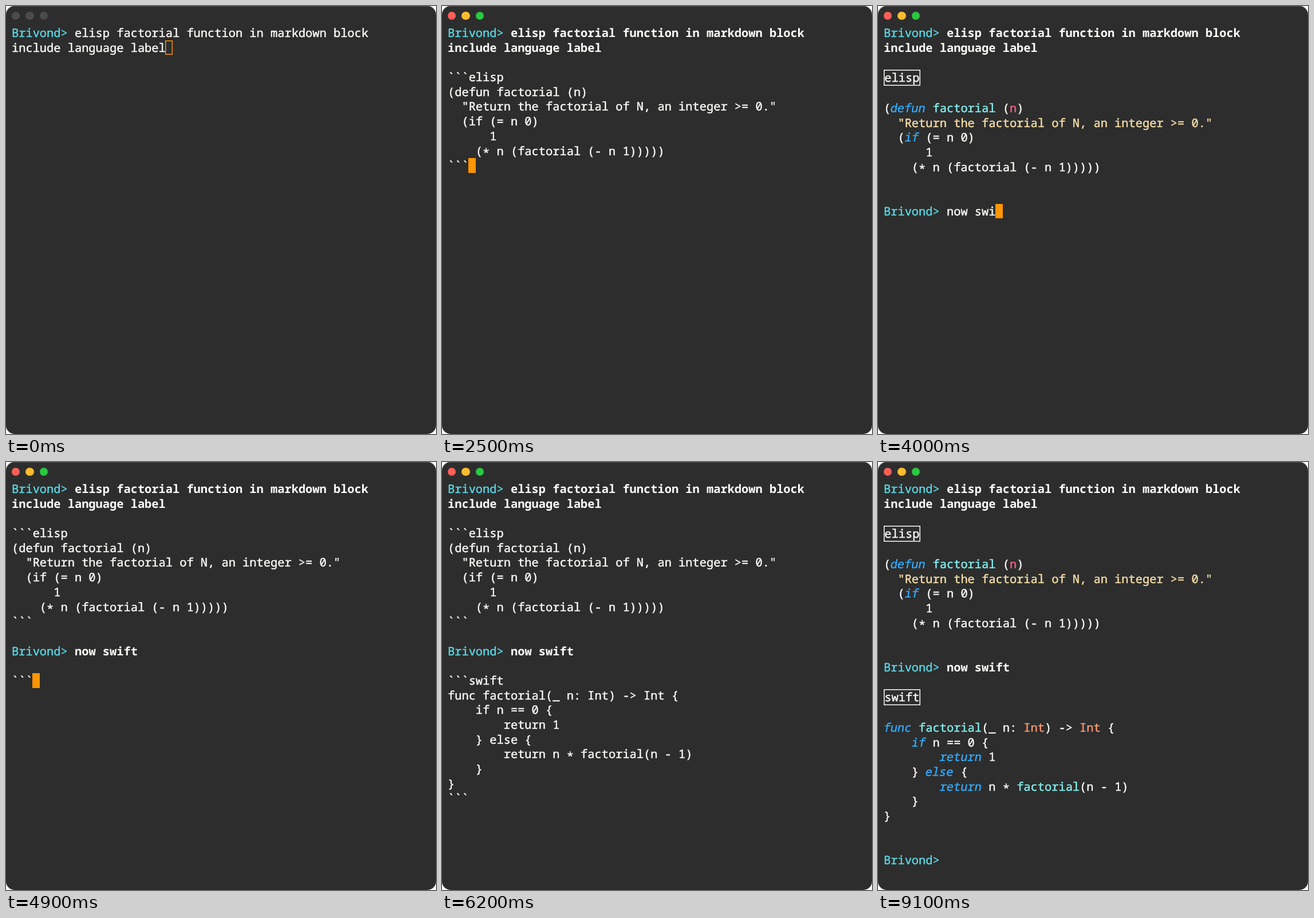
Animation, 751 px wide and 746 px high, one loop 9200 ms. Source, as an HTML page:

```html
<!DOCTYPE html>
<html lang="en">
<head>
<meta charset="utf-8">
<title>Shell chat</title>
<style>
  html, body { margin: 0; width: 100%; height: 100%; overflow: hidden; background: #fff; }
  #win {
    position: relative; width: 751px; height: 746px; overflow: hidden;
    border-radius: 15px; background: #2d2d2d; box-shadow: inset 0 1px 0 #505050;
  }
  .dot { position: absolute; top: 10px; width: 14.4px; height: 14.4px; border-radius: 50%; }
  .dot:nth-child(1) { left: 10px; background: #ff5f57; }
  .dot:nth-child(2) { left: 34.4px; background: #febc2e; }
  .dot:nth-child(3) { left: 58.8px; background: #28c840; }
  .blur .dot { background: #4b4b4b; }
  #screen {
    position: absolute; left: 10px; top: 34px; color: #fcfcfa; white-space: pre;
    font: 500 20.367px/24.6px "Noto Sans Mono", "DejaVu Sans Mono", monospace;
    font-variant-ligatures: none; text-rendering: geometricPrecision;
    -webkit-text-stroke: 0.45px currentColor;
  }
  .row { position: relative; height: 25.7px; }
  .row:has(.label) { height: 28.2px; }
  .label {
    display: inline-block; height: 28.2px; line-height: 26.4px; padding: 0 1.3px;
    box-shadow: inset 0 0 0 1.5px #fcfcfa;
  }
  .cursor {
    position: absolute; top: 0; width: 12.7px; height: 25.7px;
    margin-left: -0.4px; background: #ff9500;
  }
  .blur .cursor { background: none; box-shadow: inset 0 0 0 1.4px #ff9500; }
  .off .cursor { visibility: hidden; }
  b { font-weight: 700; -webkit-text-stroke: 0; }
  .prompt { color: #5ad9e6; }
  .key { color: #32acfa; display: inline-block; transform: skewX(-10deg); }
  .fn { color: #85f1f0; }
  .arg { color: #f7607f; }
  .str { color: #f8e0a8; }
  .type { color: #fc9a75; }
  .star { position: relative; top: 3.5px; }
</style>
</head>
<body>
<div id="win">
  <div class="dot"></div><div class="dot"></div><div class="dot"></div>
  <div id="screen"></div>
</div>
<script>
const LOOP = 9200, BLINK = 500;
const win = document.getElementById('win');
const screen = document.getElementById('screen');

const tag = (cls, text) => `<span class="${cls}">${text}</span>`;
const bold = text => text.split('\n').map(line => `<b>${line}</b>`).join('\n');
const paint = (text, rules) =>
  rules.reduce((out, [cls, re]) => out.replace(re, m => tag(cls, m)), text);

const prompt = tag('prompt', 'Brivond&gt;') + ' ';
const ask = 'elisp factorial function in markdown block\ninclude language label';
const next = 'now swift';

// Bars mark the chunks in which each answer arrives.
const elispParts = `\`\`\`|elisp
|(defun factorial| (n)
  "Return| the factorial of| N,| an integer| >= 0|."
  (if| (= n 0|)
      1||
    (* n| (factorial| (- n 1|)))))
\`\`\``.split('|');

const swiftParts = `\`\`\`|swift
func| factorial(_| n: Int|) -> Int| {
    if| n == 0| {
        return| 1
    }| else {
        return| n * factorial|(n -| 1)
    }|
}
\`\`\``.split('|');

const elispRaw = elispParts.join('');
const swiftRaw = swiftParts.join('');

// Turns a fenced answer into a boxed label and coloured code.
function pretty(raw, rules) {
  const [fence, ...code] = raw.split('\n');
  return tag('label', fence.slice(3)) + '\n\n' + paint(code.slice(0, -1).join('\n'), rules) + '\n\n\n';
}

const elispPretty = pretty(elispRaw, [
  ['str', /"Return.*"/],
  ['arg', /(?<=\()n(?=\))/],
  ['fn', /(?<=defun )factorial/],
  ['key', /defun|\bif\b/g]
]);
const swiftPretty = pretty(swiftRaw, [
  ['type', /\bInt\b/g],
  ['fn', /factorial/g],
  ['key', /\b(func|if|else|return)\b/g]
]);

const events = [];
const add = (time, text, key) => events.push({ time, text, key });

function stream(start, head, parts) {
  let text = head;
  parts.forEach((part, i) => add(start + i * 100, text += part));
}

const asked = prompt + bold(ask) + '\n';
const first = asked + '\n' + elispPretty + prompt;
const second = prompt + bold(next) + '\n';

add(0, prompt + ask, true);
add(100, prompt + ask, true);
add(500, asked, true);
stream(1000, asked + '\n', elispParts);
add(2600, first);
[...next].forEach((ch, i) => {
  add(3000 + i * 100 + Math.max(0, i - 2) * 100, first + next.slice(0, i + 1), true);
});
add(4600, asked + '\n' + elispPretty + second, true);
stream(4900, asked + '\n' + elispRaw + '\n\n' + second + '\n', swiftParts);
add(6400, asked + '\n' + elispPretty + second + '\n' + swiftPretty + prompt);

function render(text) {
  const html = text.replace(/\*/g, tag('star', '*')) + tag('cursor', '');
  screen.innerHTML = html.split('\n').map(line => `<div class="row">${line}</div>`).join('');
}

let shown;
function tick() {
  const t = performance.now() % LOOP;
  const past = events.filter(e => e.time <= t);
  const { text } = past[past.length - 1];
  const lastKey = past.filter(e => e.key).pop().time;
  if (text !== shown) render(shown = text);
  win.classList.toggle('blur', t < 100);
  // The blink restarts at every key press.
  win.classList.toggle('off', Math.floor((t - lastKey) / BLINK) % 2 === 1);
  requestAnimationFrame(tick);
}
tick();
</script>
</body>
</html>
```
